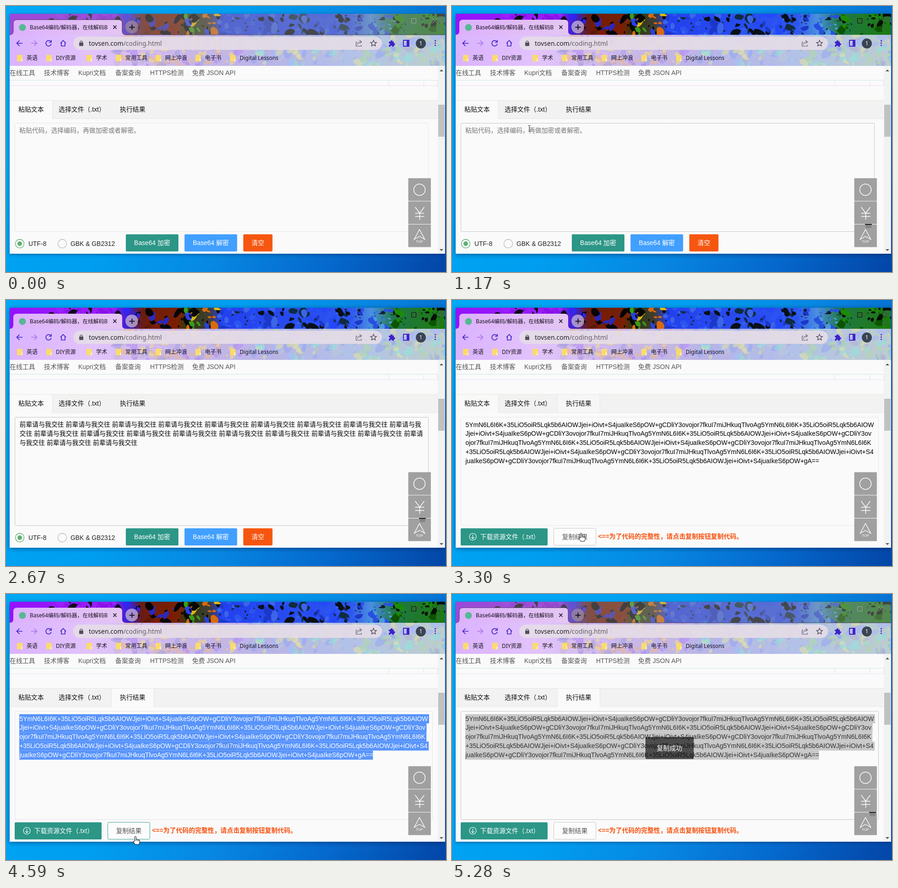
Recreate the animation shown at these times as an HTML page with a canvas. Size 962 by 582 pixels, loop 5310 ms.

```html
<!DOCTYPE html>
<html lang="zh-CN">
<head>
<meta charset="utf-8">
<title>Base64</title>
<style>
html, body { margin: 0; width: 100%; height: 100%; overflow: hidden; background: #0094ea; }
canvas { display: block; }
</style>
</head>
<body>
<canvas id="stage" width="962" height="582"></canvas>
<script>
const W = 962, H = 582, LOOP = 5310, STEP = 30;
const g = document.getElementById('stage').getContext('2d');
const PAGE_FONT = '"Liberation Sans","Noto Sans CJK SC","Noto Sans CJK",sans-serif';
const UI_FONT = '"Noto Sans","Noto Sans CJK SC","Noto Sans CJK",sans-serif';
const SIZE = 13.9, ROW = 19.9;
const INK = '#3d22c8', GREEN = '#2c9687', PAGE = '#fafafa';

const ramp = (t, a, b) => Math.min(1, Math.max(0, (t - a) / (b - a)));
const ease = k => k * k * (3 - 2 * k);
const mix = (a, b, k) => 'rgb(' + a.map((v, i) => Math.round(v + (b[i] - v) * k)) + ')';

// Text content
const PHRASE = '前辈请与我交往';
const COPIES = 20;
const repeat = n => Array(n).fill(PHRASE).join(' ');
const encode = s => btoa(String.fromCharCode(...new TextEncoder().encode(s)));
const splitAt = (s, cuts) => [0, ...cuts].map((c, i) => s.slice(c, cuts[i])).filter(Boolean);
const result = splitAt(encode(repeat(COPIES)), [119, 241, 362, 484]);

// Drawing helpers
function rect(x, y, w, h, fill, r = 0) {
  g.fillStyle = fill;
  g.beginPath();
  g.roundRect(x, y, w, h, r);
  g.fill();
}
function frame(x, y, w, h, color, r = 0) {
  g.strokeStyle = color;
  g.lineWidth = 1;
  g.beginPath();
  g.roundRect(x + .5, y + .5, w - 1, h - 1, r);
  g.stroke();
}
function disc(x, y, r, fill) {
  g.fillStyle = fill;
  g.beginPath();
  g.arc(x, y, r, 0, 7);
  g.fill();
}
function ring(x, y, r, color, width = 1) {
  g.strokeStyle = color;
  g.lineWidth = width;
  g.beginPath();
  g.arc(x, y, r, 0, 7);
  g.stroke();
}
function line(d, color, width = 1) {
  g.strokeStyle = color;
  g.lineWidth = width;
  g.stroke(new Path2D(d));
}
function shape(d, fill) {
  g.fillStyle = fill;
  g.fill(new Path2D(d));
}
function gradient(c, x, y, stops) {
  const fill = c.createLinearGradient(0, 0, x, y);
  stops.forEach(s => fill.addColorStop(...s));
  return fill;
}
// y is the vertical middle of the text
function text(s, x, y, color, { size = SIZE, font = PAGE_FONT, weight = '', align = 'left' } = {}) {
  g.font = `${weight} ${size}px ${font}`;
  g.textAlign = align;
  g.fillStyle = color;
  g.fillText(s, x, y + size * .36);
  return g.measureText(s).width;
}

// Paint-splash theme: a vivid title strip above a pastel toolbar
function makeTheme() {
  const c = document.createElement('canvas');
  c.width = W;
  c.height = 131;
  const p = c.getContext('2d');
  let seed = 41;
  const rnd = () => {
    seed = (seed * 16807) % 2147483647;
    return seed / 2147483647;
  };
  function blob(x, y, r) {
    const n = 9, a = rnd() * 6.3, flat = .5 + rnd() * .5;
    const pts = Array.from({ length: n }, (_, k) => {
      const q = k / n * 6.283, d = r * (.75 + rnd() * .5);
      const u = Math.cos(q) * d * 1.25, v = Math.sin(q) * d * flat;
      return [x + u * Math.cos(a) - v * Math.sin(a), y + u * Math.sin(a) + v * Math.cos(a)];
    });
    p.beginPath();
    for (let k = 0; k <= n; k++) {
      const [s, e] = [pts[k % n], pts[(k + 1) % n]];
      p.quadraticCurveTo(...s, (s[0] + e[0]) / 2, (s[1] + e[1]) / 2);
    }
    p.fill();
  }
  function splash(top, bottom, count, from, stops, zones, alpha) {
    p.save();
    p.beginPath();
    p.rect(0, top, W, bottom - top);
    p.clip();
    p.fillStyle = gradient(p, W, 0, stops);
    p.fillRect(0, top, W, bottom - top);
    p.globalAlpha = alpha;
    for (let i = 0; i < count; i++) {
      const x = from + rnd() * (W - from), y = top + rnd() * (bottom - top);
      const colors = zones.find(z => x <= z[0])[1];
      p.fillStyle = colors[Math.floor(rnd() * colors.length)];
      blob(x, y, 2 + 9 * rnd() ** 2);
    }
    p.restore();
  }
  splash(17, 63, 330, 100,
    [[0, '#9312ff'], [.23, '#9a1cf2'], [.28, '#3a22d0'], [.31, '#6a1c10'], [.39, '#7a2000'],
     [.41, '#2c3a10'], [.46, '#403c30'], [.49, '#2340ee'], [.78, '#2c54f0'], [.83, '#4a90e0'],
     [.88, '#207848'], [1, '#1c7a0c']],
    [[250, ['#8a10e8', '#10041c', '#9a20ff']],
     [300, ['#2a24d8', '#080408', '#5a1430', '#3424f0']],
     [385, ['#080404', '#7a1c00', '#2a28c0', '#7a2408', '#5a1804']],
     [465, ['#080804', '#e0b810', '#3c9a18', '#080804', '#d86a10', '#2a40e0']],
     [790, ['#081018', '#2448f8', '#1c38c8', '#2c54f0', '#102c40', '#3c64e8']],
     [850, ['#102030', '#4a9ae0', '#2850e0', '#3c80d8']],
     [W, ['#081008', '#1c8a08', '#0c5400', '#2a7030', '#061006']]], 1);
  splash(63, 131, 420, 240,
    [[0, '#dab2ff'], [.2, '#e2c4fb'], [.35, '#ccb8ec'], [.6, '#b8b4e6'], [.8, '#b2c2e8'], [1, '#bccecc']],
    [[520, ['#b08cf0', '#c8b8d8', '#f0d890', '#e8b898', '#d8c0f8', '#a8a4e0']],
     [W, ['#98a8f0', '#c0c4d8', '#b0d8a8', '#a8b8f8', '#98e0dc', '#e0e0a8', '#b0b4d0']]], .6);
  return c;
}
const theme = makeTheme();

function desktop(active) {
  rect(0, 0, W, H, gradient(g, W, H,
    [[0, '#00a9f5'], [.4, '#009ef0'], [.6, '#0788e2'], [.8, '#0568cc'], [1, '#0345a6']]));
  g.save();
  g.shadowColor = active ? 'rgba(0,20,60,.5)' : 'rgba(0,20,60,.4)';
  g.shadowBlur = active ? 10 : 7;
  g.shadowOffsetY = 2;
  rect(8, 17, 952, 525, PAGE);
  g.restore();
}

function browser(active) {
  g.drawImage(theme, 8, 17, 952, 114, 8, 17, 952, 114);
  if (!active) rect(8, 17, 952, 46, 'rgba(165,160,160,.38)');
  const control = active ? '#0a140a' : '#9ab0a0';
  line('M841 32.5H852M886.5 27.5H896.5V37.5H886.5ZM932 27L943 38M943 27L932 38', control);

  // Tab
  const tab = 'M8 63Q16 63 16 55V38Q16 30 24 30H246Q254 30 254 38V55Q254 63 262 63';
  shape(tab + 'Z', gradient(g, 254, 0, [[0, '#dcb0fc'], [1, '#e4c6f2']]));
  if (!active) line(tab + 'H960', 'rgba(50,35,60,.75)');
  disc(36, 47, 7.5, '#55b894');
  g.save();
  g.beginPath();
  g.rect(50, 34, 173, 26);
  g.clip();
  text('Base64编码/解码器，在线解码B', 52, 47, '#1a1020', { size: 11.8, font: UI_FONT });
  g.restore();
  line('M234.5 42.5L241.5 50M241.5 42.5L234.5 50', '#201828', 1.7);
  disc(275, 46, 14, active ? 'rgba(205,180,205,.75)' : 'rgba(165,140,150,.7)');
  line('M275.5 40.5V52M269.5 46.5H281.5', '#181018', 2);

  // Toolbar
  line('M36 81.5H24M29.5 75.5L23.5 81.5L29.5 87.5', INK, 1.7);
  line('M55 81.5H67M61.5 75.5L67.5 81.5L61.5 87.5', '#a374e6', 1.6);
  line('M98 78A6 6 0 1 0 99 83M99 74.5V79.5H94', INK, 1.7);
  line('M119 81.5L125 75.5L131 81.5M121 80V87.5H129V80', INK, 1.7);
  rect(147, 67, 675, 29, 'rgba(230,221,231,.9)', 14.5);
  rect(160, 80, 9, 7.5, '#505058', 1);
  line('M162 81V78.5A2.6 2.6 0 0 1 167 78.5V81', '#505058', 1.4);
  const host = text('tovsen.com', 181, 82, '#222028', { size: 14, font: UI_FONT });
  text('/coding.html', 181 + host, 82, '#625c68', { size: 14, font: UI_FONT });
  line('M768 79H765.5V88H777V85M768.5 85Q769 79 775 78.5M773 75L777.5 78.5L773 82', '#5c5664', 1.2);
  line('M803.5 75L805.4 79.4L810 79.8L806.5 83L807.6 87.5L803.5 85.1L799.4 87.5L800.5 83L797 79.8L801.6 79.4Z', '#4c4654', 1.3);
  shape('M837 78H840.5A2.3 2.3 0 1 1 845 78H848V81.5A2.3 2.3 0 1 1 848 86V89H844.5A2.2 2.2 0 0 0 840 89H837V85.5A2.2 2.2 0 0 0 837 81Z', INK);
  line('M869 75H881V88H869Z', INK, 1.8);
  rect(876, 75, 5, 13, INK);
  disc(907, 82, 11, '#3b4453');
  text('1', 907, 82, '#fff', { size: 12, font: UI_FONT, align: 'center' });
  [76, 81, 86].forEach(y => disc(938.5, y, 1.6, INK));

  // Bookmarks
  [[24, '英语'], [88, 'DIY资源'], [176, '学术'], [240, '常用工具'], [327, '网上冲浪'],
   [414, '电子书'], [490, 'Digital Lessons']].forEach(([x, label]) => {
    rect(x, 107, 12, 14, '#fadb6c', 1);
    rect(x + 9, 115, 3, 6, '#fff0b0', 1);
    text(label, x + 21, 114, '#18121c', { size: 12, font: UI_FONT });
  });
}

function page(fade) {
  rect(8, 131, 952, 411, PAGE);
  [[8, '在线工具'], [83, '技术博客'], [158, 'Kupri文档'], [239, '备案查询'], [315, 'HTTPS检测'],
   [407, '免费 JSON API']].forEach(([x, s]) => text(s, x, 146, '#555'));
  rect(8, 162, 936, 1, '#cfe6ec');
  rect(8, 174, 936, 1, '#ecdff4');
  [836, 913, 943].forEach(x => rect(x, 163, 1, 12, '#e6e0ea'));

  // Page tabs
  rect(8, 206, 936, 41, '#f2f2f2');
  const edges = [8, 102, 230, 323], on = [1 - fade, 0, fade];
  on.forEach((k, i) => {
    if (k > 0) rect(edges[i], 207, edges[i + 1] - edges[i], 40, mix([242, 242, 242], [250, 250, 250], Math.sqrt(k)));
  });
  rect(8, 206, 936, 1, '#ebe6dc');
  rect(edges[fade > .5 ? 0 : 1], 246, fade > .5 ? 222 : 842, 1, '#e4e6e6');
  if (fade > .5) rect(323, 246, 621, 1, '#e4e6e6');
  if (fade < 1) rect(101, 207, 1, 40, '#e6e6e6');
  if (fade > 0) [230, 323].forEach(x => rect(x, 207, 1, 40, '#e6e6e6'));
  text('粘贴文本', 27, 226, '#111');
  text('选择文件（.txt）', 115, 226, '#111');
  text('执行结果', 249, 226, '#111');
}

const borderColor = k => mix([234, 230, 236], [198, 198, 198], k);
const button = (x, w, color, label) => {
  rect(x, 499.5, w, 37.5, color, 2);
  text(label, x + w / 2, 518, '#fff', { align: 'center' });
};

function inputPane(t) {
  frame(19, 256, 905, 238, borderColor(ramp(t, 270, 540)), 2);
  if (t < 1560) {
    text('粘贴代码，选择编码，再做加密或者解密。', 29, 272, '#777');
  } else {
    const n = 1 + Math.round((COPIES - 1) * ramp(t, 1830, 2370));
    splitAt(repeat(n), [69, 139]).forEach((s, i) => text(s, 29.5, 272 + i * ROW, '#000'));
  }
  ring(30, 520, 9.5, '#5fb070', 1.3);
  disc(30, 520, 5, '#5fb070');
  text('UTF-8', 49, 520, '#222');
  ring(123, 520, 9.5, '#bcbcbc', 1.3);
  text('GBK & GB2312', 141, 520, '#222');
  const hover = ramp(t, 2880, 3000);
  button(262, 115, mix([44, 150, 135], [86, 171, 159], hover), 'Base64 加密');
  button(390.3, 115, '#419fff', 'Base64 解密');
  button(518.8, 63.8, '#f6560f', '清空');
}

function resultPane(t, active) {
  const selected = t >= 4560;
  frame(19, 256, 914, 238, borderColor(ramp(t, 4560, 4800)), 2);
  result.forEach((s, i) => {
    const y = 272.5 + i * ROW;
    if (selected) {
      g.font = `${SIZE}px ${PAGE_FONT}`;
      const extra = i < result.length - 1 ? 3 : 0;
      rect(29, y - 9.5, g.measureText(s).width + extra, ROW, active ? '#5894fb' : '#c8c8c8');
    }
    text(s, 29.5, y, selected ? (active ? '#fff' : '#333') : '#000');
  });
  rect(19, 499.5, 190, 37.5, GREEN, 2);
  ring(45.5, 518, 7.5, '#fff', 1.2);
  line('M45.5 513.5V522M42 518.8L45.5 522.3L49 518.8', '#fff', 1.2);
  text('下载资源文件（.txt）', 61.5, 518, '#fff');
  const hover = ramp(t, 4110, 4230) - ramp(t, 4620, 4800);
  rect(222, 499, 93, 38, '#fcfcfc', 2);
  frame(222, 499, 93, 38, mix([201, 201, 201], [72, 164, 150], hover), 2);
  text('复制结果', 268.5, 518, '#555', { align: 'center' });
  text('<==为了代码的完整性，请点击复制按钮复制代码。', 319.5, 517, '#f6520f', { weight: 'bold' });
}

function sideButtons() {
  for (let i = 0; i < 3; i++) rect(879.5, 376.8 + i * 50.6, 49.4, 49.6, '#a0a0a0', 1);
  ring(904, 402, 12.5, '#fff', 1.5);
  line('M894.5 440L904.5 453L914.5 440M904.5 453V468M894.5 453.5H914.5M894.5 460.5H914.5', '#fff', 1.4);
  line('M904 489L892.5 510.5L904 504L915.5 510.5Z', '#fff', 1.4);
  text('TOP', 904, 515, '#fff', { size: 7.8, align: 'center' });
}

function scrollbar() {
  rect(944, 131, 16, 411, '#f2f2f2');
  rect(945, 216, 14, 70, '#c1c1c1');
  shape('M948 143L952 139L956 143Z', '#505050');
  shape('M948 532L952 536L956 532Z', '#505050');
}

function toast(t) {
  const k = ease(ramp(t, 4560, 4800));
  if (!k) return;
  g.save();
  g.globalAlpha = k;
  g.translate(475.5, 337);
  g.scale(.5 + k / 2, .5 + k / 2);
  rect(-52.5, -24, 105.5, 48, 'rgba(0,0,0,.62)', 2);
  text('复制成功', 0, 0, '#fff', { align: 'center' });
  g.restore();
}

// Pointer track: time, x, y
const track = [
  [90, 911, 522], [600, 911, 484], [960, 168, 325], [1080, 169, 270], [1170, 169, 268],
  [1860, 169, 268], [2370, 201, 289], [2670, 202, 289], [2940, 296, 508], [3090, 296, 512],
  [3270, 282, 510], [3420, 282, 510], [3540, 283, 470], [3780, 296, 217], [3840, 296, 217],
  [4050, 287, 460], [4080, 286, 476], [4230, 283, 530], [4590, 283, 530], [4860, 918, 478]
];
function pointer(t) {
  if (t < 90 || t > 4860) return;
  const i = Math.max(1, track.findIndex(k => t <= k[0]));
  const [a, b] = [track[i - 1], track[i]];
  const k = ease(ramp(t, a[0], b[0]));
  const x = a[1] + (b[1] - a[1]) * k, y = a[2] + (b[2] - a[2]) * k;
  g.save();
  g.translate(Math.round(x), Math.round(y));
  if (y > 498 || y < 247 || x > 879) {
    const hand = 'M-1.5 1Q0 -1 1.5 1V7Q3.5 5.5 4.5 7.5Q6.5 6.5 7.2 8.5Q9.5 7.8 9.5 10V13L7.5 18H-.5L-4.5 12Q-5 9.5 -1.5 11Z';
    shape(hand, '#fff');
    line(hand + 'M1.5 7V10M4.5 7.5V10.5M7.2 8.5V11', '#111');
  } else {
    line('M-2.5 -6.5H-.5M.5 -6.5H2.5M0 -6V5.5M-2.5 6H-.5M.5 6H2.5', '#222');
  }
  g.restore();
}

// Dark trace the pointer leaves on the side buttons
function trace(t) {
  const x = t >= 4860 ? 919 : t >= 600 && t < 3000 ? 910 : 0;
  if (!x) return;
  rect(x - 6, 479, 13, 7, 'rgba(110,110,110,.5)', 3);
  rect(x - 7, 477, 15, 2, '#1c1c1c');
}

function draw(t) {
  const active = t >= 90 && t < 5280;
  desktop(active);
  browser(active);
  page(ramp(t, 3240, 3450));
  if (t < 3240) inputPane(t);
  else resultPane(t, active);
  sideButtons();
  scrollbar();
  trace(t);
  toast(t);
  pointer(t);
}

const start = performance.now();
function tick() {
  const t = (performance.now() - start) % LOOP;
  draw(Math.floor(t / STEP) * STEP);
  requestAnimationFrame(tick);
}
tick();
</script>
</body>
</html>
```
